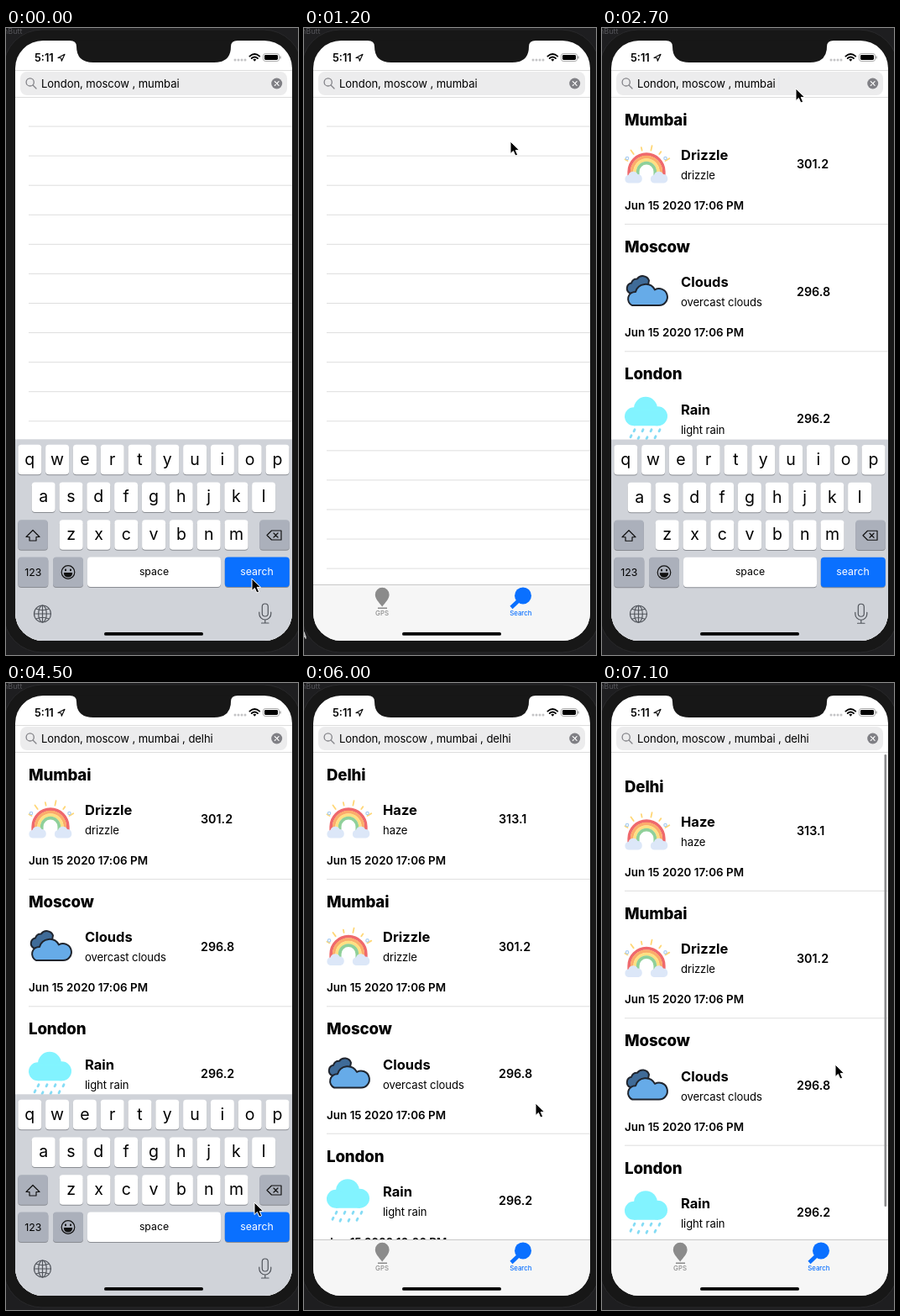
An HTML page that plays this animation: 348 by 746 pixels, repeating every 7200 ms.

```html
<!DOCTYPE html>
<html lang="en">
<head>
<meta charset="utf-8">
<style>
html, body { margin: 0; width: 100%; height: 100%; overflow: hidden; background: #1b1b1c; }
svg { display: block; width: 348px; height: 746px; font-family: Inter, Roboto, sans-serif; }
text { white-space: pre; }
.mid { text-anchor: middle; }
.body { font-size: 13.1px; letter-spacing: -.09px; }
.city { font-size: 18.7px; font-weight: 800; letter-spacing: -.15px; }
.sky { font-size: 16.5px; font-weight: 700; }
.date { font-size: 13.4px; font-weight: 600; letter-spacing: .03px; }
.temp { font-size: 14.3px; font-weight: 600; }
.key { font-size: 19.5px; font-weight: 400; }
.cap { font-size: 12.3px; }
.tab { font-size: 7.8px; font-weight: 500; }
.line { fill: none; stroke-linecap: round; stroke-linejoin: round; }
</style>
</head>
<body>
<svg viewBox="0 0 348 746">
  <defs>
    <clipPath id="screen"><rect x="11" y="15" width="330" height="714" rx="33"/></clipPath>
    <clipPath id="table"><rect x="11" y="82.5" width="330" height="580"/></clipPath>
    <g id="rainbow" class="line"></g>
    <g id="clouds" stroke="#20252e" stroke-width="2" stroke-linejoin="round">
      <path fill="#3f6b98" d="M6 82A6.5 6.5 0 0 1 8 70A7 7 0 0 1 15 65A8 8 0 0 1 29 67L26 82Z"/>
      <path fill="#66abe8" d="M9 96.7A8.5 8.5 0 0 1 13 80.500A12.5 12.5 0 0 1 36 78A10 10 0 1 1 41 96.7Z"/>
    </g>
    <g id="rain">
      <g fill="#82f3ff">
        <circle cx="25" cy="68" r="14"/><circle cx="11" cy="77.500" r="11"/><circle cx="39.500" cy="77" r="11.500"/>
        <path d="M11 70H40V88.500H11Z"/>
      </g>
      <path class="line" stroke="#85dcf5" stroke-width="2.8" d="M12 93l-1 2M22 93l-1 2M32 93l-1 2M42 93l-1 2M8 100l-1 2M17 102l-1 2M27 102l-1 2M37 101l-1 2"/>
    </g>
  </defs>

  <rect width="348" height="746" fill="#1e1e20"/>
  <rect x="-3" y="2" width="356" height="741" rx="46" fill="#171717" stroke="#29292b"/>
  <text x="-3" y="7" font-size="9" fill="#55555a">nButt</text>
  <path id="mark" class="line" stroke="#ccc" stroke-width="1.5" d="M0 719L2 726M0 724H2"/>

  <g clip-path="url(#screen)">
    <rect x="11" y="15" width="330" height="714" fill="#fff"/>
    <g clip-path="url(#table)">
      <g id="rows"></g>
      <rect id="bar" x="336.5" y="85" width="2.6" rx="1.3" fill="#8a8a8c"/>
    </g>

    <path d="M11 50.5H341M11 82.5H341" stroke="#dcdcdc"/>
    <rect x="17" y="52" width="318" height="28" rx="8" fill="#ececed"/>
    <g class="line" stroke="#838388" stroke-width="1.3"><circle cx="28.7" cy="64.4" r="4.6"/><path d="M32 68L36 72"/></g>
    <text id="query" class="body" x="42" y="70.5"></text>
    <rect id="caret" y="58" width="1.8" height="16" fill="#2f6fe0"/>
    <circle cx="322.7" cy="66" r="6.5" fill="#808085"/>
    <path class="line" stroke="#fff" stroke-width="1.2" d="M320.3 63.6l4.8 4.8m0-4.8l-4.8 4.8"/>

    <text x="34" y="39.6" font-size="12.8" font-weight="600">5:11</text>
    <path class="line" stroke="#000" stroke-width="1.1" d="M62 35.5L70 31.3L66.3 39.3L65.7 35.8Z"/>
    <path stroke="#c4c4c6" stroke-width="3" stroke-linecap="round" stroke-dasharray="0 4" d="M273 38H286"/>
    <g class="line" stroke="#000" stroke-width="1.9" stroke-linecap="butt">
      <path d="M290.4 33.6Q296.3 28.4 302.2 33.6M292.7 36Q296.3 32.8 299.9 36"/>
      <path fill="#000" stroke="none" d="M294.3 37.6Q296.3 36 298.3 37.6L296.3 39.8Z"/>
    </g>
    <rect x="306.5" y="30.5" width="19" height="9" rx="2.6" fill="none" stroke="#aaa"/>
    <rect x="308" y="32" width="16" height="6" rx="1.4"/>
    <path d="M327 33.5v3" stroke="#999" stroke-width="1.3"/>

    <rect x="11" y="662.5" width="330" height="67" fill="#f6f6f6"/>
    <path d="M11 662.5H341" stroke="#c9c9c9"/>
    <g fill="#8b8b8b">
      <path d="M93.2 688.5C89 683 84.8 679 84.8 674.2A8.4 8.4 0 0 1 101.6 674.2C101.6 679 97.4 683 93.2 688.5Z"/>
      <path d="M88 690.2H99" stroke="#8b8b8b" stroke-width="1.6"/>
      <text class="tab mid" x="93" y="699">GPS</text>
    </g>
    <g fill="#0a70ff">
      <circle cx="261" cy="675.4" r="10"/>
      <path d="M255 682L247 689.5" stroke="#0a70ff" stroke-width="4.6"/>
      <text class="tab mid" x="258.3" y="699">Search</text>
    </g>
    <g id="keyboard"></g>
    <rect x="117" y="719" width="118" height="3.8" rx="1.9"/>
  </g>

  <path fill="#171717" d="M76 14.5V15Q84 15 84 22Q84 41 104 41H248Q268 41 268 22Q268 15 276 15V14.5Z"/>
  <path id="pointer" stroke="#fff" stroke-width="1" stroke-linejoin="round" d="M0 0V14.5L3.4 11.4L5.9 17L8.6 15.8L6.2 10.4H10.6Z"/>
</svg>
<script>
const $ = id => document.getElementById(id);
const LOOP = 7200, TICK = 100, TOP = 82, ROW = 151.4, BLANK = 35.07, KB_DROP = 257;
const label = (cls, x, y, s, more = '') => `<text class="${cls}" x="${x}" y="${y}" ${more}>${s}</text>`;

// Rainbow: four bands, rays, side drops and two small clouds
const bands = ['#ef696c', '#fbac6b', '#ffe083', '#8fd09a'].map((c, i) => {
  const r = 20.8 - i * 3.5;
  return `<path stroke-linecap="butt" stroke="${c}" stroke-width="3.7" d="M${26 - r} 96V89A${r} ${r} 0 0 1 ${26 + r} 89V96"/>`;
}).join('');
const rays = [-60, -36, -12, 12, 36, 60].map((a, i) =>
  `<path stroke="#ffd777" stroke-width="1.8" d="M26 ${i % 2 ? 57.5 : 59.5}V63" transform="rotate(${a} 26 89)"/>`).join('');
const puff = x => `<path fill="#dce7f8" d="M${x + 4} 102.5a4.8 4.8 0 0 1 0-9.5a6 6 0 0 1 11-1a5.3 5.3 0 0 1 1 10.5z"/>`;
$('rainbow').innerHTML = bands + rays + puff(0.5) + puff(31) +
  '<g stroke="#a9cdf2" stroke-width="1.2"><circle cx="3" cy="73" r="1.7"/><circle cx="48.5" cy="73" r="1.7"/></g>';

const places = [
  ['Delhi', 'Haze', 'haze', '313.1', '17', 'rainbow'],
  ['Mumbai', 'Drizzle', 'drizzle', '301.2', '17', 'rainbow'],
  ['Moscow', 'Clouds', 'overcast clouds', '296.8', '17', 'clouds'],
  ['London', 'Rain', 'light rain', '296.2', '16', 'rain']
];
const separator = y => `<path d="M27 ${y}H341" stroke="#dedede"/>`;

function listMarkup(count) {
  const cells = (count ? places.slice(-count) : []).map(([city, sky, detail, temp, hour, icon], i) =>
    `<g transform="translate(0 ${TOP + i * ROW})">` +
    label('city', 27, 33.6, city) + label('sky', 94, 74.8, sky) + label('body', 94, 98, detail) +
    label('temp', 232, 85.2, temp) + label('date', 27, 134, `Jun 15 2020 ${hour}:06 PM`) +
    `<use href="#${icon}" x="27"/>` + separator(ROW) + '</g>').join('');
  let blanks = '';
  for (let y = TOP + count * ROW + BLANK; y < 662; y += BLANK) blanks += separator(y);
  return cells + blanks;
}

function keyboardMarkup() {
  const key = (x, y, w, fill = '#fff') =>
    `<rect x="${x}" y="${y + 1}" width="${w}" height="35.5" rx="4" fill="#898c92"/>` +
    `<rect x="${x}" y="${y}" width="${w}" height="35.5" rx="4" fill="${fill}"/>`;
  const grey = '#abb0bb';
  let s = '<rect x="11" y="489.3" width="330" height="260" fill="#d0d3d9"/>';
  [['qwertyuiop', 28.3], ['asdfghjkl', 44.7], ['zxcvbnm', 77.7]].forEach(([letters, x0], r) => {
    const y = 495.8 + r * 44.7;
    [...letters].forEach((c, i) => {
      const x = x0 + i * 32.8;
      s += key(x - 14, y, 28) + label('key mid', x, y + 23.8, c);
    });
  });
  s += key(14.3, 585.2, 35.5, grey) + key(302.3, 585.2, 35.5, grey) +
    key(14.3, 629.6, 36, grey) + key(56, 629.6, 36, grey) +
    key(97, 629.6, 159) + key(260.8, 629.6, 77, '#0a70ff') +
    label('cap mid', 32.3, 652, '123') + label('cap mid', 176.5, 651, 'space') +
    label('cap mid', 299, 651, 'search', 'fill="#fff"');
  return s + `<g class="line" stroke="#111" stroke-width="1.2">
    <path d="M32 597.5L40 605.5H36V610H28V605.5H24Z"/>
    <path d="M311 603.5L316.5 598H328V609H316.5ZM319 601l5 5m0-5l-5 5"/>
    <circle cx="74" cy="647.5" r="7.8"/>
    <path fill="#111" d="M69.3 648.5H78.7Q78 653 74 653T69.3 648.5Z"/>
    <path stroke-width="2" d="M71 644.5v.8M77 644.5v.8"/>
    <g stroke="#51555c">
      <circle cx="43.5" cy="697" r="10"/><ellipse cx="43.5" cy="697" rx="4.8" ry="10"/>
      <path d="M43.5 687V707M33.5 697H53.5M36 691Q43.5 694.5 51 691M36 703Q43.5 699.5 51 703"/>
      <rect x="305.3" y="685" width="7" height="15" rx="3.5"/>
      <path d="M301.8 695V697A7 7 0 0 0 315.8 697V695M308.8 704V708M304.5 708H313"/>
    </g></g>`;
}
$('keyboard').innerHTML = keyboardMarkup();

// Each stop is [ms, ...values]; eased between neighbours
function tween(stops, t) {
  const n = stops.findIndex(s => s[0] > t);
  if (n < 0) return stops[stops.length - 1].slice(1);
  if (!n) return stops[0].slice(1);
  const a = stops[n - 1], b = stops[n], u = (t - a[0]) / (b[0] - a[0]), e = u * u * (3 - 2 * u);
  return a.slice(1).map((v, i) => v + (b[i + 1] - v) * e);
}
const pointerPath = [
  [300, 293, 655], [1200, 246, 135], [1500, 243, 120], [1900, 231, 72], [3400, 231, 72],
  [4000, 298, 640], [4500, 296, 618], [4800, 293, 655], [5200, 293, 655], [6000, 276, 500],
  [6200, 276, 500], [6500, 278, 430], [6700, 278, 404], [7100, 278, 454]
];
const scrollPath = [[6500, 0], [6700, -20], [7100, 14]];

const settle = ms => { const x = Math.max(0, ms) * 0.0116; return (1 + x) * Math.exp(-x); };
function keyboardDrop(t) {
  if (t >= 1900 && t < 4900) return KB_DROP * settle(t - 1900);
  return KB_DROP * (1 - settle(t - (t < 1900 ? 200 : 4900)));
}
const blink = ms => Math.min(1, Math.max(0, (760 - ms % 1000) / 250));
function caretAlpha(t) {
  if (t < 1900) return t >= 100 && t < 300 ? 1 : 0;
  if (t >= 5000) return 0;
  return t < 3000 ? blink(t - 950) : t < 3700 ? 1 : blink(t - 3700);
}

let shown = -1;
function draw(t) {
  const count = t < 1500 ? 0 : t < 5800 ? 3 : 4;
  if (count !== shown) $('rows').innerHTML = listMarkup(shown = count);

  const [scroll] = tween(scrollPath, t);
  $('rows').setAttribute('transform', `translate(0 ${scroll})`);
  $('bar').setAttribute('opacity', t > 6500 ? 1 : 0);
  $('bar').setAttribute('y', 85 + Math.max(0, -scroll));
  $('bar').setAttribute('height', 552 - Math.max(0, scroll));

  const typed = Math.max(0, Math.min(7, Math.ceil((t - 3000) / 100)));
  $('query').textContent = 'London, moscow , mumbai ' + ', delhi'.slice(0, typed);
  $('caret').setAttribute('x', 41.6 + $('query').getComputedTextLength());
  $('caret').setAttribute('opacity', caretAlpha(t));

  $('keyboard').setAttribute('transform', `translate(0 ${keyboardDrop(t)})`);
  $('mark').setAttribute('opacity', t >= 400 && t < 1500 ? 1 : 0);
  $('pointer').setAttribute('transform', `translate(${tween(pointerPath, t)})`);
}
function frame() {
  draw(Math.floor(performance.now() % LOOP / TICK) * TICK);
  requestAnimationFrame(frame);
}
frame();
</script>
</body>
</html>
```
